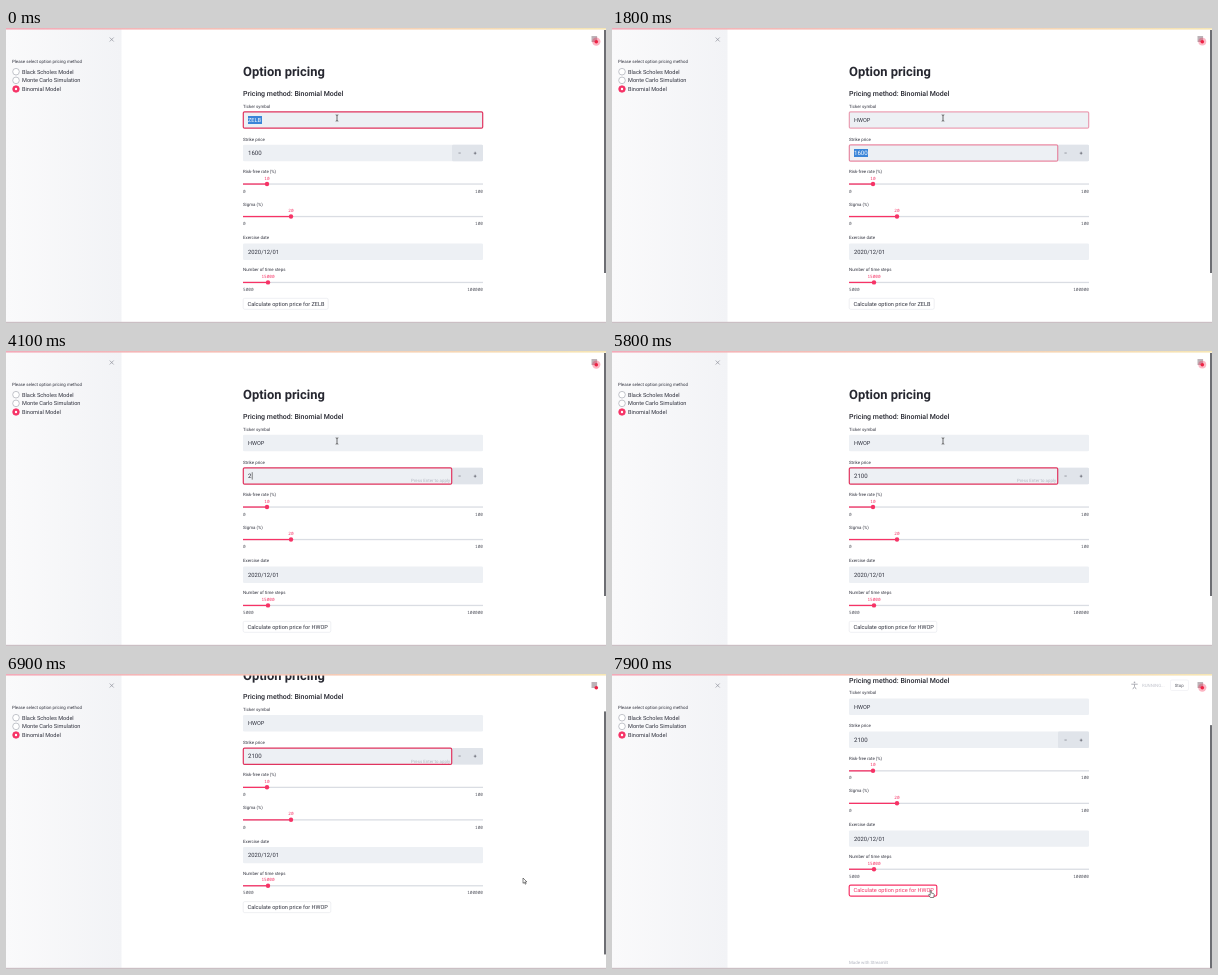
Recreate the animation shown at these times as an HTML page. Size 600 by 295 pixels, loop 8000 ms.

```html
<!DOCTYPE html>
<html lang="en">
<head>
<meta charset="utf-8">
<title>Option pricing</title>
<style>
html, body { margin: 0; width: 100%; height: 100%; overflow: hidden; background: #fff; }
svg { display: block; width: 600px; height: 295px; }
text { font: 5.6px Roboto, sans-serif; fill: #31333f; text-rendering: geometricPrecision; white-space: pre; }
.title { font-size: 12.9px; font-weight: 700; fill: #262730; }
.sub { font-size: 7px; font-weight: 500; fill: #262730; }
.label { font-size: 4.4px; }
.num { font-size: 6.1px; }
.date { font-size: 5.85px; }
.hint { font-size: 4.4px; fill: #b3b6c0; }
.tick { font: 4.4px "Noto Sans Mono", monospace; fill: #50525c; }
.red { fill: #f63366; }
.end { text-anchor: end; }
.mid { text-anchor: middle; }
.ring { fill: none; stroke: #e0345f; stroke-width: 1.2; }
</style>
</head>
<body>
<svg viewBox="0 0 600 295">
  <defs>
    <linearGradient id="side"><stop stop-color="#fafafb"/><stop offset="1" stop-color="#f2f3f6"/></linearGradient>
    <linearGradient id="deco"><stop stop-color="#f3a9b8"/><stop offset="1" stop-color="#f6e6b4"/></linearGradient>
  </defs>
  <g id="page"></g>
  <g id="frame">
    <rect width="115.5" height="295" fill="url(#side)"/>
    <path d="M103.7 9.5l4 4m0-4l-4 4" stroke="#8d909a" stroke-width=".7"/>
  </g>
  <g id="status">
    <g fill="none" stroke="#9a9ca5" stroke-width="1">
      <circle cx="522.5" cy="8.4" r=".8" fill="#9a9ca5" stroke="none"/>
      <path d="M519.3 10.2h6.4M522.5 10v2.5l-1.7 2.7m1.7-2.7l1.7 2.7"/>
      <rect x="558.5" y="6" width="18" height="10.5" rx="1.3" stroke="#e9eaee" stroke-width=".6"/>
    </g>
    <text class="hint" x="530" y="13">RUNNING...</text>
    <text class="label" x="562.7" y="12.6">Stop</text>
  </g>
  <path d="M585.5 9h5.6m-5.6 2h5.6m-5.6 2h5.6" stroke="#6d5560" stroke-width=".9"/>
  <circle id="glow" cx="590.3" cy="13.6" fill="#f5264f"/>
  <circle cx="590.3" cy="13.7" r="1.8" fill="#ee2244"/>
  <rect width="600" height="1.6" fill="url(#deco)"/>
  <rect y="293.8" width="600" height="1.2" fill="#cbbfc4"/>
  <rect id="thumb" x="598" width="2" height="243" fill="#6d6e73"/>
  <g id="mouse">
    <path id="beam" d="M-1.3-3.2Q0-3.2 0-2.4Q0-3.2 1.3-3.2M0-2.4V2.4M-1.3 3.2Q0 3.2 0 2.4Q0 3.2 1.3 3.2" fill="none" stroke="#333" stroke-width=".7"/>
    <path id="arrow" d="M-1-3V2.3L.3 1.2L1.2 3.2L2.1 2.8L1.2.9H2.9Z" fill="#fff" stroke="#333" stroke-width=".6"/>
    <path id="hand" d="M-.8-3.3q.6-.5 1 0V-1l2.4.6q.7.3.6 1L2.7 3.5H-.7L-2.5.8q.2-.7.9-.3l.8.7Z" fill="#fff" stroke="#333" stroke-width=".6"/>
  </g>
</svg>
<script>
const LOOP = 8000, OLD = "ZELB", NEW = "HWOP";
const $ = id => document.getElementById(id);
const page = $("page"), frame = $("frame");

function add(parent, tag, attrs, content = "") {
  const el = document.createElementNS("http://www.w3.org/2000/svg", tag);
  for (const key in attrs) el.setAttribute(key, attrs[key]);
  el.textContent = content;
  return parent.appendChild(el);
}
const text = (x, y, content, cls = "", parent = page) => add(parent, "text", { x, y, class: cls }, content);
const rect = (x, y, width, height, fill, more) => add(page, "rect", { x, y, width, height, fill, ...more });
const show = (el, opacity) => el.setAttribute("opacity", +opacity);
const clamp = v => Math.min(1, Math.max(0, v));
const ramp = (t, start, length) => clamp((t - start) / length);
const ease = u => u * u * (3 - 2 * u);
const mix = (a, b, u) => a + (b - a) * u;

// Sidebar
text(6, 34.8, "Please select option pricing method", "label", frame);
["Black Scholes Model", "Monte Carlo Simulation", "Binomial Model"].forEach((name, i) => {
  const cy = 43.7 + i * 8.65, on = i === 2;
  add(frame, "circle", { cx: 10, cy, r: 3.3, fill: on ? "#f63366" : "#fff", stroke: on ? "#f63366" : "#a9acb5", "stroke-width": .7 });
  if (on) add(frame, "circle", { cx: 10, cy, r: 1.2, fill: "#fff" });
  text(16, cy + 2, name, "", frame);
});

// Form
text(237, 48.3, "Option pricing", "title");
text(237, 68, "Pricing method: Binomial Model", "sub");

function field(y, label, width, cls) {
  text(237, y - 4.3, label, "label");
  rect(237, y, 240, 16.4, "#edf0f4", { rx: 1.2 });
  if (width < 240) {
    rect(237 + width, y, 240 - width, 16.4, "#e0e4ea", { rx: 1.2 });
    text(453.5, y + 10.1, "−", "mid");
    text(469, y + 10.1, "+", "mid");
  }
  return {
    select: rect(242, y + 4.2, 14, 8, "#3a85d8"),
    value: text(242, y + 10.3, "", cls),
    caret: rect(0, y + 4.4, .6, 7.4, "#333"),
    hint: text(235 + width, y + 14.6, "Press Enter to apply", "hint end"),
    ring: rect(237.3, y + .1, width - .6, 16.2, "none", { rx: 1.2, class: "ring" })
  };
}

function slider(y, label, value, low, high, x) {
  text(237, y - 11, label, "label");
  rect(237, y - .6, 240, 1.3, "#dadde3");
  rect(237, y - .6, x - 237, 1.3, "#f63366");
  add(page, "circle", { cx: x, cy: y, r: 2.2, fill: "#f63366" });
  text(x, y - 4.4, value, "tick mid red");
  text(237, y + 8.7, low, "tick");
  text(477, y + 8.7, high, "tick end");
}

const ticker = field(83.8, "Ticker symbol", 240, "");
const strike = field(116.8, "Strike price", 209, "num");
const date = field(215.6, "Exercise date", 240, "date");
date.value.textContent = "2020/12/01";
for (const key of ["select", "caret", "hint", "ring"]) date[key].remove();
slider(156, "Risk-free rate (%)", "10", "0", "100", 261);
slider(188.5, "Sigma (%)", "20", "0", "100", 285);
slider(254.4, "Number of time steps", "15000", "5000", "100000", 262);
const button = rect(237.2, 270.3, 85, 11, "#fff", { rx: 1.5 });
const caption = text(241.5, 277.6, "");
text(237, 349.6, "Made with Streamlit", "hint");

// Each key time adds one letter; the caret blinks from the latest one.
function typing(box, before, after, keys, t, focus, blur) {
  const count = keys.filter(k => t >= k).length, typed = count > 0;
  const selected = !typed && t >= focus;
  box.value.textContent = typed ? after.slice(0, count) : before;
  box.value.style.fill = selected ? "#fff" : "";
  show(box.select, selected);
  show(box.hint, typed && t < blur);
  show(box.caret, typed && t < blur && (t - keys[count - 1]) % 1000 < 500);
  if (typed) box.caret.setAttribute("x", 242.4 + box.value.getComputedTextLength());
  show(box.ring, ramp(t, focus - 10, 200) * (1 - ramp(t, blur - 10, 200)));
}

function draw(t) {
  typing(ticker, OLD, NEW, [700, 900, 1100, 1300], t, -1000, 1700);
  typing(strike, "1600", "2100", [4000, 4400, 4700, 5000], t, 1700, 7650);

  const scroll = 59.2 * ease(ramp(t, 6650, 385));
  page.setAttribute("transform", `translate(0 ${-scroll})`);
  $("thumb").setAttribute("y", 2 + .83 * scroll);

  const updated = t >= 2300, hover = t >= 7500;
  caption.textContent = "Calculate option price for " + (updated ? NEW : OLD);
  caption.style.fill = hover ? "#f63366" : "";
  button.setAttribute("width", updated ? 87.6 : 85);
  button.setAttribute("stroke", hover ? "#f63366" : "#e4e6eb");
  button.setAttribute("stroke-width", t >= 7700 ? 1.2 : .6);

  show($("status"), ramp(t, 1950, 250) * (1 - ramp(t, 2550, 250)) + .8 * ramp(t, 7700, 200));

  const pulse = (1 + Math.cos(Math.PI * t / 1000)) / 2;
  $("glow").setAttribute("r", 1.8 + 2.4 * pulse);
  show($("glow"), .35 * pulse);

  const away = ease(ramp(t, 6200, 400)), back = ease(ramp(t, 7050, 500));
  const x = mix(mix(331, 518, away), 319, back), y = mix(mix(90, 207, away), 220, back);
  $("mouse").setAttribute("transform", `translate(${x} ${y})`);
  const overField = y < 101;
  show($("beam"), overField);
  show($("hand"), hover);
  show($("arrow"), !overField && !hover);
}

function tick() {
  draw(performance.now() % LOOP);
  requestAnimationFrame(tick);
}
tick();
</script>
</body>
</html>
```
